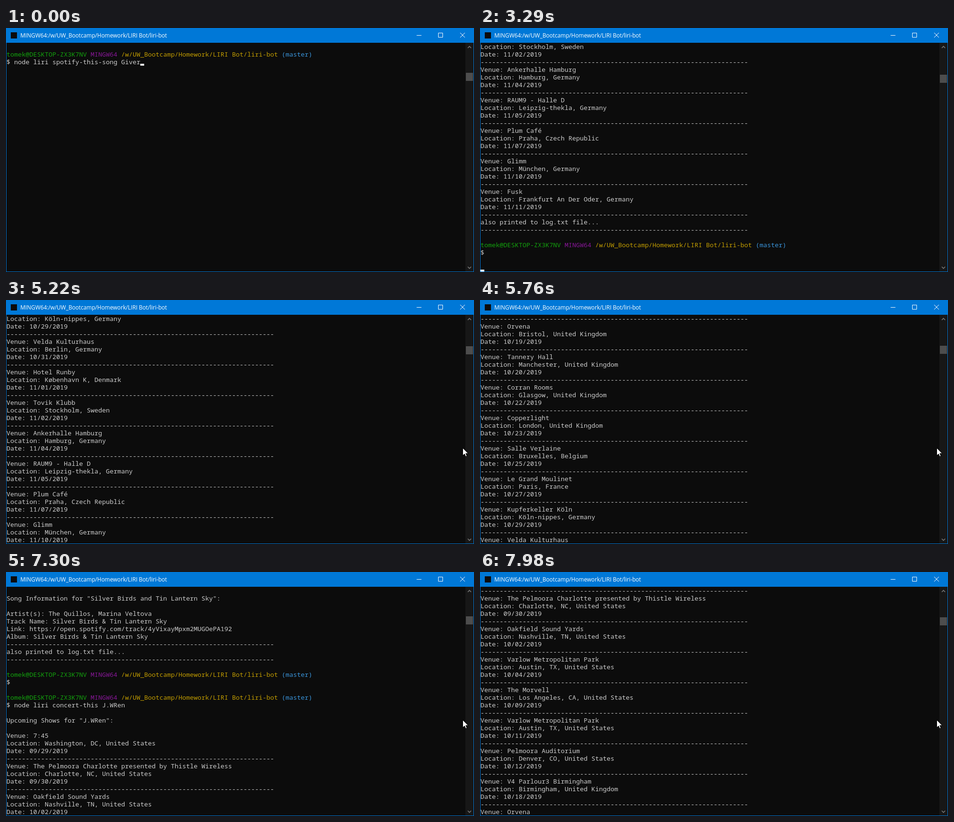
Write an HTML page that moves like this. It is 979 by 512 pixels and loops after 8 s.

```html
<!DOCTYPE html>
<html lang="en">
<head>
<meta charset="utf-8">
<title>Terminal</title>
<style>
  html, body { margin: 0; width: 100%; height: 100%; overflow: hidden; background: #0c0c0c; }
  #win { position: relative; width: 979px; height: 512px; overflow: hidden; background: #0c0c0c; }
  #view { position: absolute; left: 1px; top: 31px; width: 960px; height: 480px; overflow: hidden; }
  #lines {
    position: absolute; left: 0; top: 0; color: #ccc;
    font: 13.3333px/16px "Noto Sans Mono", "DejaVu Sans Mono", monospace;
    font-variant-ligatures: none;
  }
  #lines div { position: absolute; left: 0; height: 16px; white-space: pre; }
  #caret { width: 8px; height: 4px; background: #fff; position: absolute; }
  #chrome { position: absolute; left: 0; top: 0; }
  #title { font: 11.7px "Open Sans", "Noto Sans", sans-serif; fill: #fff; }
  .user { color: #13a10e; }
  .sys { color: #881798; }
  .path { color: #c19c00; }
  .branch { color: #3a96dd; }
</style>
</head>
<body>
<div id="win">
  <div id="view"><div id="lines"></div><div id="caret"></div></div>
  <svg id="chrome" width="979" height="512" viewBox="0 0 979 512">
    <rect width="979" height="31" fill="#0078d7"/>
    <path d="M.5 31V511.5H978.5V31" fill="none" stroke="#0078d7"/>
    <rect x="10" y="9" width="13" height="13" fill="#0c0c0c"/>
    <text id="title" x="30" y="20">MINGW64:/w/UW_Bootcamp/Homework/LIRI Bot/liri-bot</text>
    <g fill="none" stroke="#fff">
      <path d="M859 15.5h10M904.5 10.5h9v9h-9z"/>
      <path d="M950 10l10 10M960 10l-10 10"/>
    </g>
    <rect x="961" y="31" width="17" height="480" fill="#171717"/>
    <path d="M966 42l3.500-3.500 3.500 3.500M966 501l3.500 3.500 3.500-3.500" fill="none" stroke="#777" stroke-width="1.600"/>
    <rect id="thumb" x="962" y="94" width="15" height="17" fill="#4d4d4d"/>
    <path id="mouse" d="M.5.5V16.500L4.200 13 6.700 18.500 9.200 17.400 6.800 12H11.800Z" fill="#fff" stroke="#000"/>
  </svg>
</div>
<script>
const LOOP = 8000, ROW = 16, COL = 8, STEP = 70;
const $ = id => document.getElementById(id);
const PROMPT = [
  ["user", "tomek@DESKTOP-ZX3K7NV"], ["sys", " MINGW64"],
  ["path", " /w/UW_Bootcamp/Homework/LIRI Bot/liri-bot"], ["branch", " (master)"]
];
const RULE = "-".repeat(70);
const SONG = "Silver Birds and Tin Lantern Sky";
const TRACK = SONG.replace("and", "&");
const SONG_CMD = "$ node liri spotify-this-song Giver";
const SHOW_CMD = "$ node liri concert-this J.WRen";

const US = ", United States", UK = ", United Kingdom", DE = ", Germany";
const shows = [
  ["7:45", "Washington, DC" + US, "09/29"],
  ["The Pelmoora Charlotte presented by Thistle Wireless", "Charlotte, NC" + US, "09/30"],
  ["Oakfield Sound Yards", "Nashville, TN" + US, "10/02"],
  ["Varlow Metropolitan Park", "Austin, TX" + US, "10/04"],
  ["The Morvell", "Los Angeles, CA" + US, "10/09"],
  ["Varlow Metropolitan Park", "Austin, TX" + US, "10/11"],
  ["Pelmoora Auditorium", "Denver, CO" + US, "10/12"],
  ["V4 Parlour3 Birmingham", "Birmingham" + UK, "10/18"],
  ["Orvena", "Bristol" + UK, "10/19"],
  ["Tannery Hall", "Manchester" + UK, "10/20"],
  ["Corran Rooms", "Glasgow" + UK, "10/22"],
  ["Copperlight", "London" + UK, "10/23"],
  ["Salle Verlaine", "Bruxelles, Belgium", "10/25"],
  ["Le Grand Moulinet", "Paris, France", "10/27"],
  ["Kupferkeller Köln", "Köln-nippes" + DE, "10/29"],
  ["Velda Kulturhaus", "Berlin" + DE, "10/31"],
  ["Hotel Runby", "København K, Denmark", "11/01"],
  ["Tovik Klubb", "Stockholm, Sweden", "11/02"],
  ["Ankerhalle Hamburg", "Hamburg" + DE, "11/04"],
  ["RAUM9 - Halle D", "Leipzig-thekla" + DE, "11/05"],
  ["Plum Café", "Praha, Czech Republic", "11/07"],
  ["Glimm", "München" + DE, "11/10"],
  ["Fusk", "Frankfurt An Der Oder" + DE, "11/11"]
];
const footer = [RULE, "also printed to log.txt file...", RULE, "", PROMPT];

// Line numbers start at FIRST, so that line 0 opens the song report.
const FIRST = -4;
const buffer = [
  RULE, "", PROMPT, "$ node liri spotify-this-song " + SONG,
  "", `Song Information for "${SONG}":`, "",
  "Artist(s): The Quillos, Marina Veltova",
  "Track Name: " + TRACK,
  "Link: https://open.spotify.com/track/4yVixayMpxm2MUGOePA192",
  "Album: " + TRACK,
  ...footer, "$", "", PROMPT, SHOW_CMD, "",
  'Upcoming Shows for "J.WRen":', "",
  ...shows.flatMap(([venue, place, day], i) => [
    ...(i ? [RULE] : []), "Venue: " + venue, "Location: " + place, `Date: ${day}/2019`
  ]),
  ...footer, "$"
];
const CMD = 15, LAST = FIRST + buffer.length - 1;

const rows = buffer.map((line, i) => {
  const row = document.createElement("div");
  row.style.top = (i + FIRST) * ROW + "px";
  if (Array.isArray(line)) {
    for (const [cls, text] of line) {
      const span = document.createElement("span");
      span.className = cls;
      span.textContent = text;
      row.append(span);
    }
  } else row.textContent = line;
  $("lines").append(row);
  return row;
});

// Bursts of scrolling: start time, then the top line after each step.
const scroll = [
  [0, 13], [2100, 50, 86], [3290, 88, 89, 90],
  [5080, 86, 81, 76], [5550, 71, 64, 57, 50], [5960, 44, 37, 30],
  [6300, 22, 13, 4, -4], [7300, 0, 3, 6, 9], [7840, 13, 18, 22]
].flatMap(([t, ...tops]) => tops.map((top, i) => [t + i * STEP, top]));

// Time and last printed line.
const printed = [[0, CMD], [2100, 78], [2170, 114], [3290, 116], [3360, 118], [3430, LAST]];

// Time, then line and column of the caret; time alone hides it.
const caret = [
  [0, 15, 35], [260], [460, 15, 31], [720], [1180, 15, 31], [1640],
  [1840, 16, 0], [2100, 79, 0], [2170, 115, 0], [2960], [3290, 117, 0], [3360],
  [3430, LAST, 2], [3890], [4350, LAST, 2], [4750]
];
const mouse = [[0], [4350, 972, 324], [4420, 962, 316], [4490, 955, 310]];

const at = (table, t) => table.findLast(step => step[0] <= t);

function draw(t) {
  const top = at(scroll, t)[1], end = at(printed, t)[1];
  const [, line, col] = at(caret, t), [, mx, my] = at(mouse, t);
  rows.forEach((row, i) => row.style.visibility = i + FIRST <= end ? "visible" : "hidden");
  rows[CMD - FIRST].textContent = t < 460 ? SONG_CMD : SHOW_CMD;
  $("lines").style.top = -top * ROW + "px";
  $("thumb").setAttribute("y", Math.floor(93.95 + top * 0.0483));

  const c = $("caret").style;
  c.display = line === undefined ? "none" : "block";
  if (line !== undefined) {
    c.left = col * COL + "px";
    c.top = (line - top) * ROW + 12 + "px";
  }
  $("mouse").style.display = mx === undefined ? "none" : "inline";
  if (mx !== undefined) $("mouse").setAttribute("transform", `translate(${mx} ${my})`);
}

const start = performance.now();
function tick() {
  draw((performance.now() - start) % LOOP);
  requestAnimationFrame(tick);
}
tick();
</script>
</body>
</html>
```
